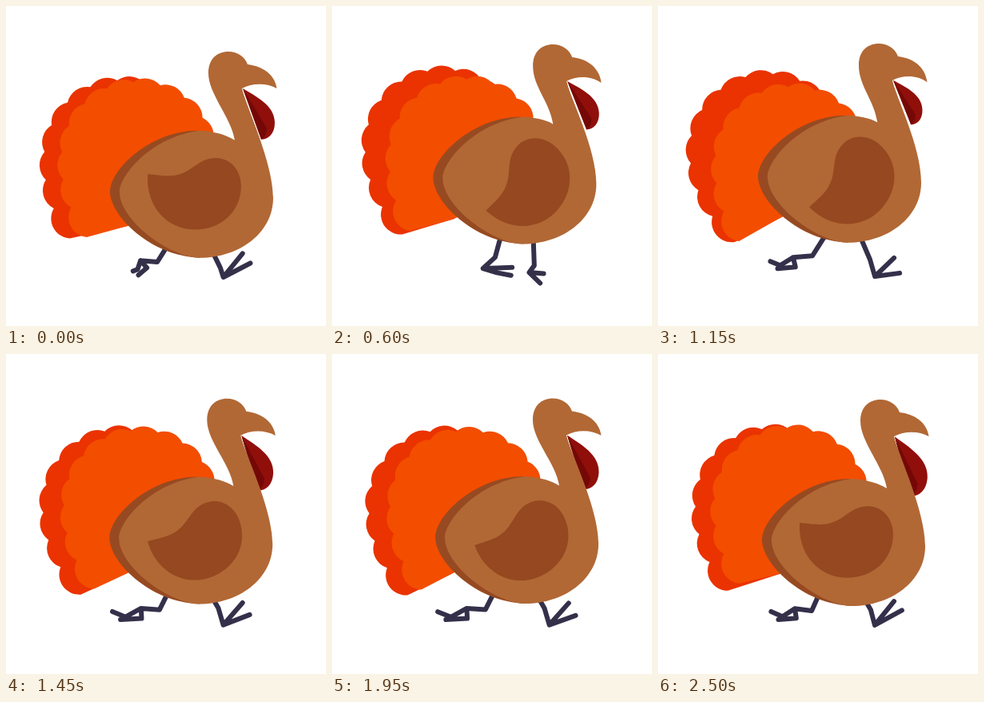
These frames come from a looping animation (400 px wide and 400 px high, 2530 ms). An HTML page:

```html
<!DOCTYPE html>
<html lang="en">
<head>
<meta charset="utf-8">
<title>Running turkey</title>
<style>
  html, body { margin: 0; height: 100%; overflow: hidden; background: #fff; }
  svg { display: block; width: 100%; height: 100%; }
  .leg { fill: none; stroke: #35304a; stroke-width: 6; stroke-linecap: round; stroke-linejoin: round; }
</style>
</head>
<body>
<svg viewBox="0 0 400 400">
  <path id="tailBack" fill="#ea3300"/>
  <path id="tailFront" fill="#f34d00"/>
  <path id="leftLeg" class="leg"/>
  <path id="rightLeg" class="leg"/>
  <g id="wattle">
    <path fill="#900f0b" d="M296 103C312 113 336 124 336 146C336 160 328 167 319 167Z"/>
    <path fill="#740806" d="M296 103L326 153Q325 165 319 167Z"/>
  </g>
  <path id="rump" fill="#974a21" d="M130 232C130 205 180 156 240 156L243 315C180 313 130 262 130 232Z"/>
  <path id="body" fill="#b16835"/>
  <path id="wing" fill="#964820" d="M177 212C200 214 210 216 226 207C238 200 246 190 262 190C282 190 294 207 294 225C294 258 268 280 236 280C203 280 175 253 177 212Z"/>
</svg>
<script>
const LOOP = 2530, CYCLE = LOOP / 5, STEP = CYCLE / 2;
const $ = id => document.getElementById(id);

// Smooth periodic curve through values at the given phases (0..1)
function curve(phases, values, p) {
  const n = phases.length;
  const x = i => phases[(i + n) % n] + Math.floor(i / n);
  const y = i => values[(i + n) % n];
  const slope = i => (y(i + 1) - y(i - 1)) / (x(i + 1) - x(i - 1));
  let i = n - 1;
  while (phases[i] > p) i--;
  const w = x(i + 1) - x(i), u = (p - x(i)) / w, v = 1 - u;
  return y(i) * v * v * (1 + 2 * u) + y(i + 1) * u * u * (3 - 2 * u)
    + w * u * v * (slope(i) * v - slope(i + 1) * u);
}

const CYCLE_PHASES = [0, .209, .273, .458, .685, .941];
const SWAY = {
  bodyX: [0, -4, -5, -6, -3, 0],
  bodyY: [0, -19, -19.3, -18, -10, 0],
  headX: [0, -2, -2, -7, -6, 0],
  wattleTurn: [0, -2, -2, -4, -4, 5],
  wattleSize: [1, .95, .88, .82, .82, 1.13],
  backX: [145, 138, 137, 138, 142, 144],
  backY: [190, 176, 182, 190, 195, 190],
  backTurn: [123, 114, 110, 105, 108, 118],
  frontX: [165, 168, 167, 172, 172, 166],
  frontY: [190, 187, 196, 193, 197, 188],
  frontTurn: [123, 127, 124, 110, 110, 123]
};

// Leg poses: knee, ankle, then the toe points
const STEP_PHASES = [0, .18, .385, .42, .546, .9];
const LEFT = [
  [189, 311, 168, 309, 164, 320, 158, 322, 176, 318, 165, 327],
  [200, 315, 182, 326, 188, 336, 200, 344, 182, 340, 190, 350],
  [204, 314, 189, 328, 207, 327, 226, 326, 207, 333, 225, 336],
  [203, 320, 187, 333, 204, 333, 221, 333, 204, 341, 220, 342],
  [193, 313, 169, 315, 153, 325, 141, 320, 172, 327, 150, 329],
  [192, 312, 171, 309, 156, 319, 142, 313, 173, 321, 151, 323]
];
const RIGHT = [
  [268, 327, 272, 339, 296, 309, 306, 321],
  [258, 328, 250, 337, 274, 338, 266, 352],
  [253, 324, 247, 333, 265, 334, 261, 346],
  [263, 318, 263, 337, 286, 324, 289, 341],
  [265, 317, 271, 338, 295, 315, 302, 334],
  [266, 320, 271, 339, 295, 309, 305, 320]
];
const legPose = (poses, q, lift = 0) =>
  poses[0].map((_, i) => curve(STEP_PHASES, poses.map(pose => pose[i]), q) + (i % 2 ? lift : 0));

function drawLeg(id, hip, pose) {
  const [kneeX, kneeY, ankleX, ankleY, ...toes] = pose, half = toes.length / 2;
  const ankle = `${ankleX} ${ankleY}`;
  $(id).setAttribute('d', `M${hip}L${kneeX} ${kneeY} ${ankle}L${toes.slice(0, half).join(' ')}`
    + `M${ankle}L${toes.slice(half).join(' ')}`);
}

// Scalloped fan, from its lower corner clockwise to behind the body
function drawFan(id, cx, cy, turn, radius, bodyY) {
  let d = '';
  for (let i = 0; i <= 11; i++) {
    const a = (turn + i * 20.5) * Math.PI / 180;
    const r = radius + [23, 9, 2][i] || radius;
    d += (i ? 'A25 25 0 0 1 ' : 'M') + `${cx + r * Math.cos(a)} ${cy + r * Math.sin(a)}`;
  }
  $(id).setAttribute('d', `${d}L220 230L152 ${275 + bodyY * .5}Z`);
}

const shift = (dx, dy) => (...xy) => xy.map((v, i) => v + (i % 2 ? dy : dx)).join(' ');

function draw(t) {
  const p = t / CYCLE % 1, q = t / STEP % 1;
  const s = {};
  for (const key in SWAY) s[key] = curve(CYCLE_PHASES, SWAY[key], p);
  // The last hop is a little higher
  const x = s.bodyX, y = s.bodyY * (t > LOOP - CYCLE ? 1.15 : 1);
  const headY = y * .52;

  drawFan('tailBack', s.backX, s.backY, s.backTurn, 97, y);
  drawFan('tailFront', s.frontX, s.frontY, s.frontTurn, 95, y);
  drawLeg('leftLeg', `${201 + x - y * .85} ${301 + y}`, legPose(LEFT, q, (y + 18) / 2));
  drawLeg('rightLeg', `${255 + x} ${301 + y}`, legPose(RIGHT, q));

  const b = shift(x, y), h = shift(s.headX, headY), throat = shift(x + y * .35, y * 1.16);
  const beak = shift(s.headX, headY - y * .12);
  $('body').setAttribute('d', `M${b(243, 156)}C${b(262, 157, 276, 162)} ${throat(286, 168)}`
    + `C${throat(282, 140)} ${h(253, 110, 253, 84)}`
    + `C${h(253, 66, 264, 57, 278, 57)}C${h(290, 57, 299, 64, 302, 73)}`
    + `C${h(320, 75, 336, 85)} ${beak(338.5, 103)}C${h(326, 96, 308, 96, 295, 103)}`
    + `C${h(300, 125)} ${b(334, 195, 334, 240)}C${b(334, 285, 290, 315, 243, 315)}`
    + `C${b(205, 315, 142, 268, 142, 233)}C${b(142, 212, 182, 163, 243, 156)}Z`);
  $('rump').setAttribute('transform', `translate(${x} ${y})`);

  const flap = 28 * Math.cos(2 * Math.PI * (q - .95)) - 25;
  $('wing').setAttribute('transform', `translate(${x} ${y}) rotate(${flap} 252 222)`);
  $('wattle').setAttribute('transform', `translate(${296 + s.headX} ${102 + headY}) `
    + `rotate(${s.wattleTurn}) scale(${s.wattleSize}) translate(-296 -102)`);
}

const start = performance.now();
function tick() {
  draw((performance.now() - start) % LOOP);
  requestAnimationFrame(tick);
}
tick();
</script>
</body>
</html>
```
